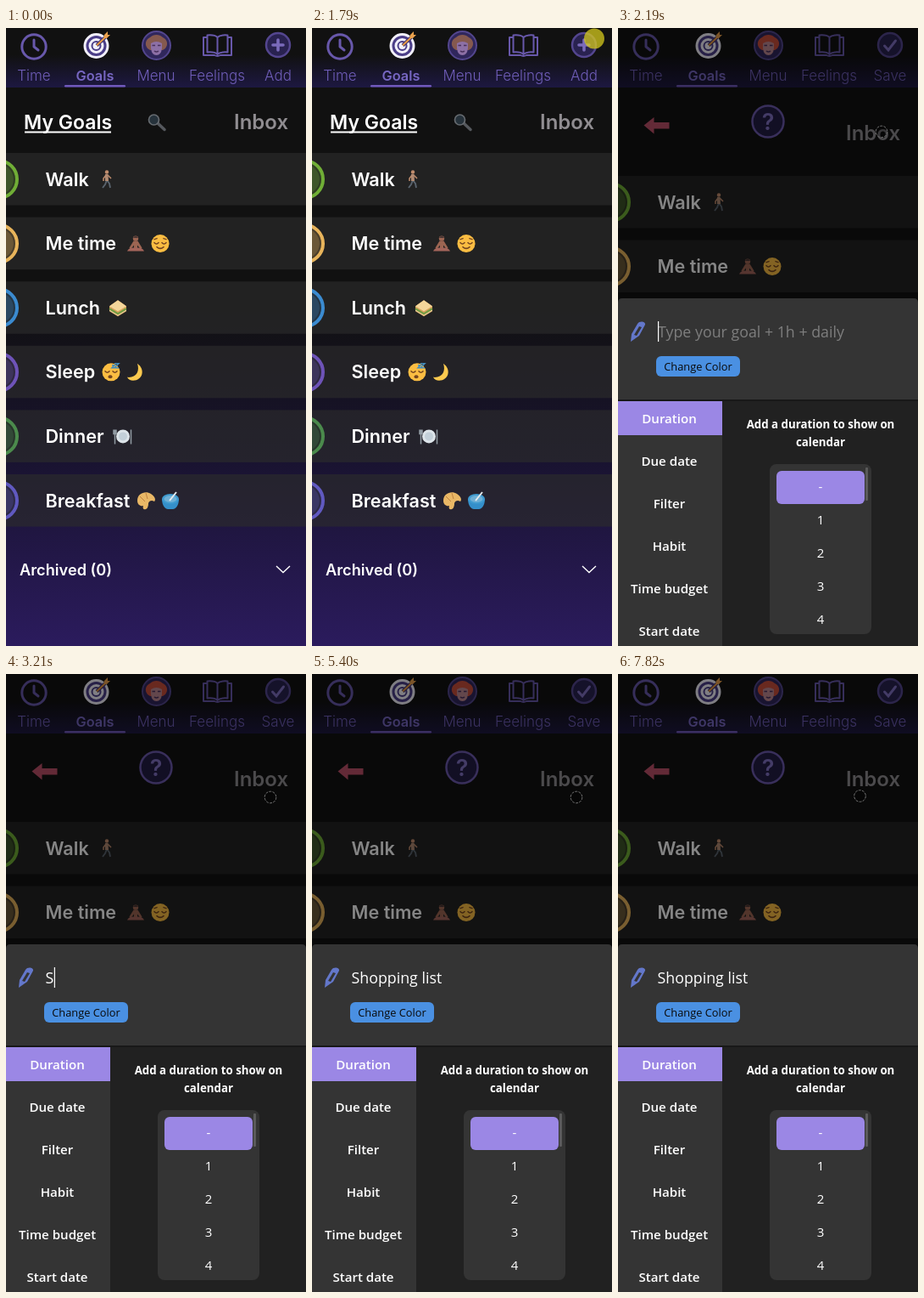
An HTML page for the animation above (8 s loop, 354x727 px).

```html
<!DOCTYPE html>
<html lang="en">
<head>
<meta charset="utf-8">
<title>Goals</title>
<style>
  html, body { margin: 0; width: 100%; height: 100%; overflow: hidden; background: #111; }
  svg { display: block; width: 354px; height: 727px; }
  text { font-family: Inter, sans-serif; font-weight: 600; fill: #fff; white-space: pre; }
  .mid { text-anchor: middle; }
  .nav text { font-size: 17px; font-weight: 300; fill: #6f5db8; }
  .nav .active { font-size: 16.3px; font-weight: 600; fill: #7767c2; }
  .line { fill: none; stroke: #6858ab; stroke-width: 3; stroke-linejoin: round; stroke-linecap: round; }
  #modal text { font-family: "Open Sans", sans-serif; }
  #modal .input { font-size: 17.8px; font-weight: 400; }
  #modal .button { font-size: 12.8px; font-weight: 500; fill: #0a0a0a; }
  #modal .tab { font-size: 15.1px; }
  #modal .item { font-size: 15px; font-weight: 400; }
  #modal .title { font-size: 13.3px; font-weight: 700; }
</style>
</head>
<body>
<svg viewBox="0 0 354 727">
  <defs>
    <linearGradient id="page" x2="0" y2="1">
      <stop offset=".45" stop-color="#111"/><stop offset=".7" stop-color="#191330"/><stop offset="1" stop-color="#2b1b5d"/>
    </linearGradient>
    <linearGradient id="bar" x2="0" y2="1">
      <stop offset=".45" stop-color="#111"/><stop offset="1" stop-color="#1d1841"/>
    </linearGradient>
  </defs>
  <rect width="354" height="727" fill="url(#page)"/>

  <g class="nav">
    <rect width="354" height="70" fill="url(#bar)"/>
    <g class="mid">
      <text x="33" y="62">Time</text><text x="105" y="62" class="active">Goals</text>
      <text x="177" y="62">Menu</text><text x="249" y="62">Feelings</text>
      <text x="321" y="62" id="addLabel">Add</text>
    </g>
    <rect x="69" y="67" width="72" height="2.5" rx="1.2" fill="#7059bb"/>
    <g class="line">
      <circle cx="33" cy="22" r="14.2"/><path d="M33 14v8l5 4"/>
      <path stroke-width="2" d="M249.500 11c-2-2-6-3-12-2.500v20c6-.5 10 .5 12 2.500 2-2 6-3 12-2.500v-20c-6-.5-10 .5-12 2.500v20M237 11h-4v21h13q3.500 2 7 0h13v-21h-4"/>
    </g>
    <g fill="none" stroke="#f2f0fa" stroke-width="3">
      <circle cx="106.500" cy="21" r="13.500" fill="#4b3e88"/>
      <circle cx="106.500" cy="21" r="7.500"/>
      <circle cx="106.500" cy="21" r="2.500" fill="#fff"/>
      <path d="M107 20.500L117 11" stroke="#3d316f" stroke-width="4"/>
      <path d="M107 20.500L117 11" stroke="#e89a45" stroke-width="2"/>
      <path d="M115 12l1-4 4-4v4h3l-4 4z" fill="#eba14c" stroke="none"/>
    </g>
    <circle cx="177.500" cy="20.500" r="16.500" fill="#30275c" stroke="#53468e" stroke-width="2"/>
    <g id="avatar">
      <path fill="var(--hair)" d="M167 24c-4-5-2-11 3-13 4-4 11-4 15 0 5 2 7 8 3 13l-3 2h-15z"/>
      <path fill="var(--skin)" d="M171 18q6.500-4 13 0v6q-1 8-6.500 8t-6.500-8z"/>
      <path d="M172.500 20.500h3.500m3 0h3.500m-7.500 6.500q2.500 2 5 0" fill="none" stroke="#49305c" stroke-width="1.500"/>
    </g>
    <circle cx="321" cy="20" r="14" fill="#292250" stroke="#54468f" stroke-width="2.500"/>
    <path id="plus" d="M321 14v12M315 20h12" fill="none" stroke="#7a6aba" stroke-width="3.600" stroke-linecap="round"/>
    <path id="check" d="M314.500 21l4.500 5 8.500-11" fill="none" stroke="#8070c3" stroke-width="3" stroke-linecap="round"/>
  </g>

  <g id="home">
    <text x="21" y="119" font-size="23">My Goals</text>
    <path d="M22 122.500h102" stroke="#fff" stroke-width="2"/>
    <path d="M179 112l8 7.500" stroke="#55585d" stroke-width="3.500" stroke-linecap="round"/>
    <circle cx="174.500" cy="108" r="6" fill="#26323b" stroke="#666b70" stroke-width="1.700"/>
  </g>
  <g id="edit">
    <path d="M30.500 114.500l12-9.500v6h18v7.500h-18v6z" fill="#bd5069"/>
    <circle cx="177" cy="110" r="18.500" fill="#231c45" stroke="#6c5aae" stroke-width="2.500"/>
    <g id="lens"><path d="M178 111l8 8" stroke="#8877cb" stroke-width="3.500" stroke-linecap="round"/><circle cx="174" cy="107" r="6.500" fill="#8877cb"/></g>
    <text id="help" class="mid" x="177" y="120" font-size="27" style="fill:#8272c5">?</text>
  </g>
  <text id="inbox" x="269" y="119" font-size="24" style="fill:#908d91">Inbox</text>
  <g id="list">
    <g id="goals"></g>
    <text x="16" y="644" font-size="18.200">Archived (0)</text>
    <path d="M319 633l8 7.500 8-7.500" fill="none" stroke="#fff" stroke-width="1.400"/>
  </g>

  <rect id="dim" width="354" height="727"/>
  <g id="modal">
    <path d="M0 437v-114q0-5 5-5h344q5 0 5 5v114z" fill="#343434"/>
    <rect y="437" width="354" height="2" fill="#181818"/>
    <rect y="439" width="354" height="290" fill="#212121"/>
    <rect y="439" width="123" height="290" fill="#343434"/>
    <rect y="439" width="123" height="40" fill="#9b87e5"/>
    <g id="pen">
      <path d="M15 369l1-9 7-12c2-4 10-3 9 1l-7 13z" fill="#6377ca"/>
      <path d="M19 361l6-10 3 1-6 10z" fill="#343434"/>
    </g>
    <text id="hint" class="input" x="47" y="364" style="fill:#7e7e7e">Type your goal + 1h + daily</text>
    <text id="typed" class="input" x="46.500" y="364"></text>
    <rect id="caret" y="345" width="1.200" height="24" fill="#fff"/>
    <rect x="45" y="386" width="99" height="24" rx="6" fill="#4a90e2"/>
    <text class="mid button" x="94.500" y="403">Change Color</text>
    <g id="tabs" class="mid"></g>
    <g class="mid">
      <text class="title" x="239" y="471">Add a duration to show on</text>
      <text class="title" x="239" y="492">calendar</text>
    </g>
    <rect x="179" y="513" width="120" height="200" rx="8" fill="#343434"/>
    <rect x="187" y="521" width="104" height="39" rx="6" fill="#9b87e5"/>
    <rect x="292" y="517" width="3" height="39" rx="1" fill="#5a5a5a"/>
    <g id="items" class="mid"></g>
  </g>

  <g id="pointer">
    <circle id="click" r="12" fill="#d6ca1c" opacity=".75"/>
    <circle id="ring" r="6.800" fill="#000" fill-opacity=".25" stroke="#777" stroke-dasharray="3 1.300"/>
  </g>
</svg>

<script>
const $ = id => document.getElementById(id);
const face = mouth => `<circle r="10.500" fill="#fbbd42"/>
  <path d="M-7-1q2.500 3 5 0M2-1q2.500 3 5 0${mouth}" fill="none" stroke="#74451f" stroke-width="1.500" stroke-linecap="round"/>`;

// Small pictures, each centred on 0,0
const pictures = {
  walk: `<path d="M0 1l3 4 1 5M0 1l-2 5-3 4" fill="none" stroke="#59636d" stroke-width="1.900"/>
    <path d="M-1-5l-3 4v3M1-5l4 4" fill="none" stroke="#c08c6c" stroke-width="1.500"/>
    <path d="M-2-6h3.500l.5 8h-4z" fill="#b08a72"/><circle cx="0" cy="-8.500" r="2.200" fill="#c08c6c"/>`,
  meditate: `<path d="M-2.500-3h5l5 8-1.500 2-4-5v4h-4v-4l-4 5-1.500-2z" fill="#9c6552"/>
    <path d="M-10 9q2-5 10-4 8-1 10 4z" fill="#a4655b"/>
    <circle cy="-6" r="3.200" fill="#9c6552"/><path d="M-3.200-6.500q3.200-5 6.400 0z" fill="#493633"/>`,
  relieved: face("M-4 4q4 3.500 8 0M-7-5l3-1M4-6l3 1"),
  sandwich: `<path d="M-10-2L0-9 10-2v6L0 10-10 4z" fill="#d8a25b"/><path d="M-10-2L0-9 10-2 0 4z" fill="#f4d69a"/>
    <path d="M-10 1L0 7 10 1" fill="none" stroke="#6f9d43" stroke-width="2"/><path d="M-10 3L0 9 10 3" fill="none" stroke="#e9d4a3"/>`,
  sleep: face("") + `<ellipse cx="-1" cy="5.500" rx="2.500" ry="2" fill="#74451f"/>
    <path d="M4-10h5l-5 5h5M1-8h3l-3 3h3" fill="none" stroke="#428dbd" stroke-width="1.500"/>`,
  moon: `<path d="M2-10c10 7 6 20-5 20q-5 0-7-4C1 7 5-1 2-10z" fill="#fbc94f"/>`,
  plate: `<circle r="8" fill="#dde5ea"/><circle r="5" fill="#c3d0d9"/>
    <path d="M-9.500-8v17M9.500-8v17M-11-8v5h3v-5" fill="none" stroke="#919ba3" stroke-width="1.500"/>`,
  croissant: `<path d="M-10 0c0-9 10-12 16-8 5 3 6 7 4 9-3-2-6-1-7 2 0 1 0 6-3 7-3 1-4-1-3-4-3 1-7-1-7-6z" fill="#eab866"/>
    <path d="M-7-5l6 6M0-9l2 7" stroke="#c08140"/>`,
  bowl: `<path d="M-10-2h20c0 8-4 12-7 12h-6c-3 0-7-4-7-12z" fill="#348fca"/><ellipse cy="-2" rx="10" ry="6" fill="#3f9bd0"/>
    <ellipse cy="-2" rx="7.500" ry="4" fill="#6fb0d6"/><path d="M-1 0L7-10" stroke="#e6ecef" stroke-width="2"/>`
};

const goals = [
  ["Walk", "#70ae36", { walk: 119 }],
  ["Me time", "#e8b45b", { meditate: 153, relieved: 182 }],
  ["Lunch", "#3b8bd0", { sandwich: 132 }],
  ["Sleep", "#6e53b8", { sleep: 124, moon: 153 }],
  ["Dinner", "#4b8a4c", { plate: 138 }],
  ["Breakfast", "#6059c0", { croissant: 165, bowl: 194 }]
];
$("goals").innerHTML = goals.map(([name, color, icons], i) => `
  <g transform="translate(0 ${147 + 75.6 * i})">
    <rect width="354" height="61.500" fill="#2b2b2b" opacity=".65"/>
    <circle cx="-9" cy="31" r="22" fill="${color}" fill-opacity=".36" stroke="${color}" stroke-width="4"/>
    <circle cx="-9" cy="31" r="18.800" fill="none" stroke="#191919" stroke-opacity=".4" stroke-width="2"/>
    <text x="46.500" y="38.500" font-size="21.600">${name}</text>
    ${Object.entries(icons).map(([icon, x]) => `<g transform="translate(${x} 31)">${pictures[icon]}</g>`).join("")}
  </g>`).join("");

const column = (labels, type, x, y, step) =>
  labels.map((label, i) => `<text class="${type}" x="${x}" y="${y + i * step}">${label}</text>`).join("");
$("tabs").innerHTML = column(["Duration", "Due date", "Filter", "Habit", "Time budget", "Start date"], "tab", 60.5, 465, 50);
$("items").innerHTML = column(["-", 1, 2, 3, 4], "item", 239, 545, 39);

// Tracks of [start time, ...value]; each value holds until the next
const pointerTrack = [
  [600, 281, 694], [800, 280, 645], [1000, 289, 440], [1200, 312, 190], [1400, 329, 42], [1600, 333, 11],
  [1790, 333, 12.5], [2000, 329, 34], [2190, 311, 122], [2380, 312, 145], [5600, 311.5, 146], [7820, 285.5, 143.5]
];
const typingTrack = [
  [0, 0], [3180, 1], [3390, 2], [3600, 3], [3990, 5], [4190, 7], [4390, 8], [4600, 9], [4800, 11], [5000, 13]
];
const caretTrack = [
  [0, 1], [2380, 0], [2980, 1], [5400, 0], [6000, 1], [6420, 0], [6830, 1], [7230, 0]
];
const at = (track, t) => track.filter(([start]) => start <= t).pop()?.slice(1);
const show = (id, on) => $(id).style.display = on ? "" : "none";
const move = (id, x, y) => $(id).setAttribute("transform", `translate(${x} ${y})`);
const fade = (id, opacity) => $(id).setAttribute("opacity", opacity);

function draw(t) {
  const editing = t >= 2000, settled = t >= 2190;
  show("home", !editing);
  show("edit", editing);
  show("plus", !settled);
  show("check", settled);
  show("lens", !settled);
  show("help", settled);
  show("pen", settled);
  show("modal", editing);
  move("list", 0, editing ? 27 : 0);
  move("inbox", 0, editing ? 13 : 0);
  move("modal", 0, settled ? 0 : -19);
  fade("modal", settled ? 1 : 0.88);
  fade("edit", settled ? 1 : 0.75);
  fade("dim", settled ? 0.48 : editing ? 0.4 : 0);
  $("addLabel").textContent = editing ? "Save" : "Add";
  $("avatar").style.cssText = editing ? "--hair:#c94e3b;--skin:#bd8792" : "--hair:#85594f;--skin:#8d70a6";

  const [count] = at(typingTrack, t), [caretOn] = at(caretTrack, t);
  $("typed").textContent = "Shopping list".slice(0, count);
  show("hint", !count);
  show("caret", caretOn);
  if (editing) $("caret").setAttribute("x", 47 + (count && $("typed").getComputedTextLength()));

  const spot = at(pointerTrack, t);
  show("pointer", spot);
  if (spot) move("pointer", ...spot);
  show("click", t >= 1790 && !editing);
  show("ring", t < 1790 || editing);
}

function tick() {
  draw(performance.now() % 8000);
  requestAnimationFrame(tick);
}
tick();
</script>
</body>
</html>
```
